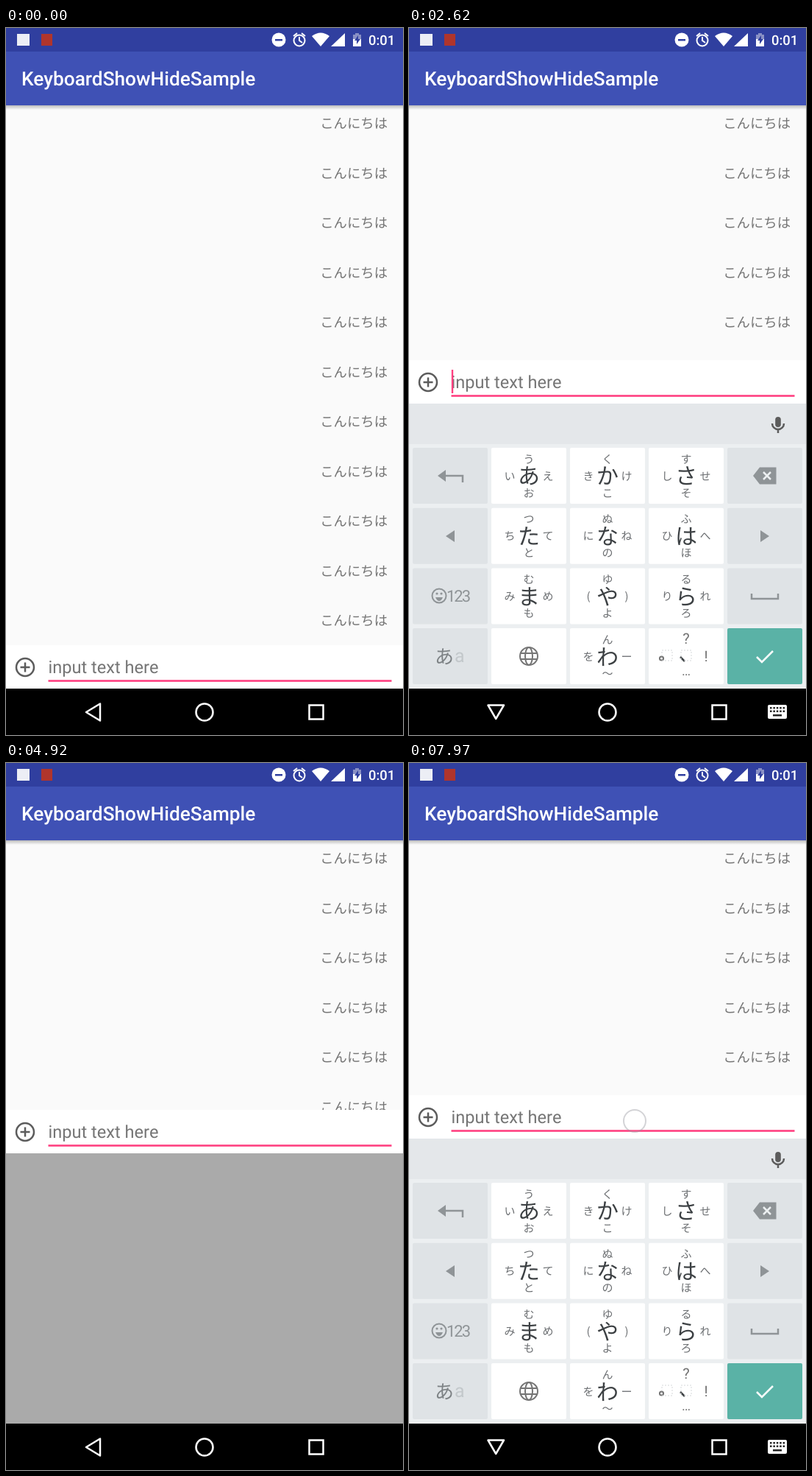
Recreate the animation shown at these times as an HTML page. Size 540 by 960 pixels, loop 8 s.

```html
<!DOCTYPE html>
<html lang="ja">
<head>
<meta charset="utf-8">
<style>
html, body { margin: 0; height: 100%; overflow: hidden; background: #000; }
svg { display: block; width: 100vw; height: 100vh; }
text { font-family: Roboto, "Noto Sans CJK JP", "Noto Sans CJK", sans-serif; text-rendering: geometricPrecision; }
.kana { font-family: "Noto Sans CJK JP", "Noto Sans CJK", sans-serif; text-anchor: middle; }
.line { fill: none; stroke-width: 2.5; }
.thin .line { stroke-width: 2; }
</style>
</head>
<body>
<svg id="stage" viewBox="0 0 540 960"></svg>
<script>
const BG = '#fafafa', INK = '#757575', DARK = '#5c5c5c', RED = '#ff4081',
  ICON = '#8f9497', WHITE = '#fff', STATUS = '#303f9f';

const rect = (x, y, w, h, fill, more = '') =>
  `<rect x="${x}" y="${y}" width="${w}" height="${h}" fill="${fill}" ${more}/>`;
const shape = (d, fill) => `<path d="${d}" fill="${fill}"/>`;
const disc = (x, y, r, fill) => `<circle cx="${x}" cy="${y}" r="${r}" fill="${fill}"/>`;
const line = (d, color, more = '') => `<path class="line" d="${d}" stroke="${color}" ${more}/>`;
const ring = (x, y, r, color) => `<circle class="line" cx="${x}" cy="${y}" r="${r}" stroke="${color}"/>`;
const thin = s => `<g class="thin">${s}</g>`;
const label = (x, y, size, fill, str, more = '') =>
  `<text x="${x}" y="${y}" font-size="${size}" fill="${fill}" ${more}>${str}</text>`;
const kana = (x, y, size, fill, str) =>
  label(x, y + size * 0.38, size, fill, str, 'class="kana"');

function statusBar() {
  return rect(0, 0, 540, 32, STATUS)
    + rect(15, 8, 17, 16, '#eceef5') + rect(48, 8, 15, 16, '#b0352c')
    + disc(371, 16, 9.5, WHITE) + rect(366, 15, 10, 2.5, STATUS)
    + thin(ring(399, 17, 7.5, WHITE) + line('M391 11l5-4M407 11l-5-4M399 12v5l4 3', WHITE))
    + shape('M416 11Q428 2 440 11L428 25Z', WHITE)
    + shape('M442 25H461V7Z', WHITE)
    + shape('M472 9h3V7h5v2h3v7h-11Z', '#8990c5') + shape('M472 15h11v10h-11Z', WHITE)
    + shape('M479 10l-5 7h3v5l5-7h-3Z', STATUS)
    + label(493, 22.8, 18.4, WHITE, '0:01', 'font-weight="500"');
}

function list() {
  let s = rect(0, 105, 540, 792, BG);
  for (let i = 0; i < 11; i++)
    s += label(519, 136.3 + i * 67.5, 18.37, INK, 'こんにちは', 'class="kana" style="text-anchor:end"');
  return s;
}

// Drawn around y = 0, the middle of the hint
const inputBar = () => rect(0, -30, 540, 59, WHITE)
  + ring(26, 0, 12, DARK) + line('M19.5 0h13M26-6.5v13', DARK)
  + label(57.5, 8.3, 23.6, INK, 'input text here')
  + rect(57.5, 17.2, 467, 2.6, RED)
  + rect(57.8, -17, 2.4, 32, RED, 'id="cursor"');

function keyboard() {
  const colX = c => 56 + c * 107, rowY = r => 608 + r * 81.7;
  const kanaRows = [
    ['あいうえお', 'かきくけこ', 'さしすせそ'],
    ['たちつてと', 'なにぬねの', 'はひふへほ'],
    ['まみむめも', 'や(ゆ)よ', 'らりるれろ'],
    ['', 'わをんー〜', '']
  ];
  let s = rect(0, 510, 540, 387, '#eceff1') + rect(0, 510, 540, 55, '#e4e7ea');
  for (let r = 0; r < 4; r++) {
    for (let c = 0; c < 5; c++) {
      const x = colX(c), y = rowY(r);
      const fill = c % 4 ? WHITE : r == 3 && c ? '#5ab2a6' : '#dfe3e6';
      s += rect(x - 51, y - 38, 102, 76, fill, 'rx="2"');
      const [mid, left, up, right, down] = kanaRows[r][c - 1] || '';
      if (mid) {
        s += kana(x, y, 30, '#3c4043', mid);
        [[left, -26, 0], [up, 0, -23], [right, 26, 0], [down, 0, 23]]
          .forEach(([ch, dx, dy]) => s += kana(x + dx, y + dy, 15, '#6c6f72', ch));
      }
    }
  }
  // Side keys
  s += shape('M39 608l11-8v16Z', ICON) + line('M48 608H73V617', ICON)
    + shape('M50 690l12-8v16Z', ICON) + shape('M490 690l-12-8v16Z', ICON)
    + shape('M468 608l9-11.5h22.5v23h-22.5Z', ICON)
    + line('M482 603l10 10M492 603l-10 10', '#eceff1')
    + line('M466 768v7h36v-7', ICON)
    + thin(ring(41, 771, 9.5, ICON)) + shape('M36 773h10q-2 5-5 5t-5-5Z', ICON)
    + disc(38, 768, 1.6, ICON) + disc(44, 768, 1.6, ICON)
    + label(51, 779, 22, ICON, '123', 'letter-spacing="-2"')
    + kana(48, 853, 26, '#7d8285', 'あ') + label(62, 861, 25, '#c3c8cb', 'a')
    + line('M473 854l7 7 15-15', WHITE);
  // Globe
  s += thin(ring(163, 853, 12, INK) + line('M152 849h22M152 857h22', INK)
    + `<ellipse class="line" cx="163" cy="853" rx="5" ry="12" stroke="${INK}"/>`);
  // Punctuation
  s += label(377, 836, 20, INK, '?', 'text-anchor="middle"')
    + label(404, 860, 20, INK, '!', 'text-anchor="middle"')
    + label(377, 879, 18, INK, '…', 'text-anchor="middle"')
    + thin(ring(343.5, 856, 2.6, INK)) + line('M369 854l6 6', '#3c4043')
    + [344, 370].map(x => rect(x, 845, 14, 14, 'none', 'stroke="#d5d8da" stroke-dasharray="2 2"')).join('');
  // Microphone
  return s + rect(498.2, 528, 7.6, 14, DARK, 'rx="3.8"')
    + line('M494 537a8 8 0 0 0 16 0M502 545v5', DARK);
}

function navIcons() {
  const round = 'stroke-linejoin="round"';
  let keys = rect(488, 919, 26, 19, WHITE, 'rx="2"') + rect(495, 932, 12, 2.5, '#222');
  for (let i = 0; i < 10; i++)
    keys += rect(491 + i % 5 * 4.4, 922 + (i > 4) * 4.5, 2.5, 2.5, '#222');
  return ring(270, 929, 11.5, WHITE) + line('M412.5 919.5h19v19h-19Z', WHITE)
    + `<g id="back">${line('M109 929L128 917.5V940.5Z', WHITE, round)}</g>`
    + `<g id="hide">${line('M107.5 919.5H129L118.2 938Z', WHITE, round)}${keys}</g>`;
}

stage.innerHTML = `<defs><linearGradient id="shade" x2="0" y2="1">
    <stop stop-opacity=".25"/><stop offset="1" stop-opacity="0"/>
  </linearGradient></defs>`
  + list() + rect(0, 897, 540, 63, '#000')
  + rect(0, 0, 540, 0, BG, 'id="below"')
  + `<g id="bar">${inputBar()}</g>`
  + rect(0, 105, 540, 6, 'url(#shade)') + rect(0, 32, 540, 73, '#3f51b5')
  + label(21, 78.3, 26.25, WHITE, 'KeyboardShowHideSample', 'font-weight="500"')
  + statusBar()
  + `<g id="kb">${keyboard()}</g>` + navIcons()
  + '<circle id="dot" r="15" fill="#fff" fill-opacity=".2" stroke="#96969e" stroke-width="2"/>';

const el = id => document.getElementById(id);
const bar = el('bar'), below = el('below'), kb = el('kb'), cursor = el('cursor'),
  back = el('back'), hide = el('hide'), dot = el('dot');
const show = (node, on) => node.setAttribute('visibility', on ? 'visible' : 'hidden');
const clamp = v => Math.max(0, Math.min(1, v));

const SHOW1 = 2420, HIDE = 4710, SHOW2 = 6490;
const blinks = [[160, 640], [1120, 1600], [2140, 2680], [3160, 3640],
  [4120, 4600], [5130, 5620], [6150, 6690], [7170, 7650]];
// start, end, x, y
const taps = [[2140, 2400, 298, 861], [4550, 4860, 34, 478], [6150, 6410, 300, 497], [7810, 8060, 307, 486]];

function draw(t) {
  const y = t < SHOW1 ? 868 : t < HIDE ? 481 : t < SHOW2 ? 501 : 481;
  bar.setAttribute('transform', `translate(0 ${y})`);
  below.setAttribute('y', y + 29);
  below.setAttribute('height', 868 - y);
  below.setAttribute('fill', y == 501 ? '#aaa' : BG);

  const leaving = t >= HIDE && t < SHOW2;
  const u = leaving ? clamp((t - HIDE) / 180) : clamp((t - (t < HIDE ? SHOW1 : SHOW2)) / 200);
  const shift = leaving ? u * u : (1 - u) ** 2;
  const alpha = leaving ? 1 - u * u : 1 - (1 - u) ** 3;
  kb.setAttribute('transform', `translate(0 ${79 * shift})`);
  kb.setAttribute('opacity', alpha);

  const open = t >= SHOW1 && !leaving;
  show(back, !open);
  show(hide, open);
  show(cursor, blinks.some(([a, b]) => t >= a && t < b));

  const tap = taps.find(([a, b]) => t >= a && t < b);
  show(dot, tap);
  if (tap) {
    dot.setAttribute('cx', tap[2]);
    dot.setAttribute('cy', tap[3]);
    dot.setAttribute('opacity', 0.7 * clamp((tap[1] - t) / 150));
  }
}

function tick(now) {
  draw(now % 8000);
  requestAnimationFrame(tick);
}
draw(0);
requestAnimationFrame(tick);
</script>
</body>
</html>
```
